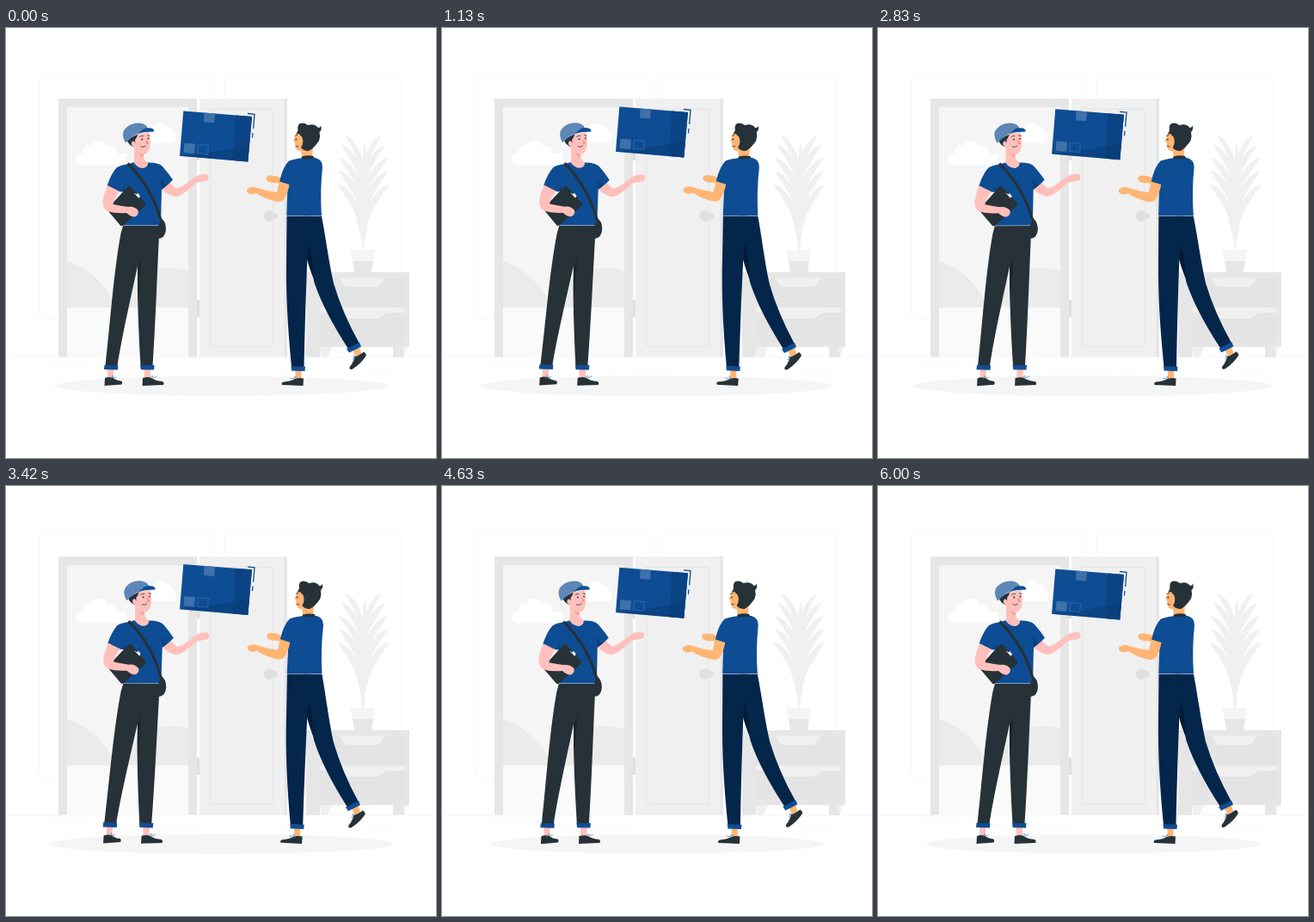
Recreate the animation shown at these times as an HTML page. Size 500 px wide and 500 px high, loop 6.04 s.

```html
<!DOCTYPE html>
<html lang="en">
<head>
<meta charset="utf-8">
<title>Parcel delivery</title>
<style>
  html, body { margin: 0; width: 100%; height: 100%; overflow: hidden; background: #fff; }
  svg { display: block; width: 100%; height: 100%; }
  .blue { fill: #0e4d94; } .ink { fill: #263238; } .navy { fill: #05264b; }
  .pink { fill: #ffc0bc; } .tan { fill: #ffb573; } .line { fill: none; stroke-linecap: round; stroke-linejoin: round; }
</style>
</head>
<body>
<svg viewBox="0 0 500 500">
  <g id="room">
    <g fill="none" stroke="#ebebeb" stroke-width=".4">
      <rect x="38.3" y="55.1" width="204.4" height="282.6" rx="5.6"/>
      <rect x="254.5" y="55.1" width="204.4" height="282.6" rx="5.6"/>
      <path d="M0 382.5H500M52.5 391h43.2M104.6 391h6.3M131.5 395.2h93.7M396.6 389.3h19.2M416.8 398.6h33.1M322.5 401.3h8.7"/>
    </g>
    <path fill="#e6e6e6" d="M61 82H222V382.5H61Z"/>
    <path fill="#f5f5f5" d="M71 92H212V382.5H71Z"/>
    <path fill="#fff" d="M87 159.500C79 159 79 146 89 145.500C88 138 95 135 98 136.500C103 128 116 130 118 138C124 135 129 140 129 146H140V159.500ZM166 134C160 131 164 123 170 122C168 110 182 107 187 115C191 114 194 118 193 121C200 121 199 134 193 134Z"/>
    <path fill="#ebebeb" d="M71 271C96 279 116 298 128 325H71ZM118 325C140 300 160 279 190 279Q203 279 212 283V325Z"/>
    <path fill="#fafafa" d="M71 325H212V382.5H71Z"/>
    <path fill="#e0e0e0" d="M222 316h3v20h-3ZM222 134h3v20h-3Z"/>
    <path fill="#f0f0f0" d="M225 82H327V382.5H225Z"/>
    <path fill="#e6e6e6" d="M323.500 82H327V382.5H323.500Z"/>
    <path fill="none" stroke="#e3e3e3" stroke-width=".9" d="M238 94.300H310V370H238Z"/>
    <path fill="#e0e0e0" d="M306 212a6.500 6.500 0 1 0 5 10.500h3q2-1 2-3.500t-2-4h-3a6.500 6.500 0 0 0-5-3Z"/>

    <path fill="#e6e6e6" d="M349 284H365V382.5H349Z"/>
    <path fill="#f0f0f0" d="M361 284H469V371H361Z"/>
    <path fill="#e6e6e6" d="M361 284H469V371H464V290.500H365V365H464V371H361Z"/>
    <path fill="#e4e4e4" d="M365 290.500H386Q389 291 391 296T398 301H430Q434 301 437 296T443 290.500H464V325H365ZM365 331H386Q389 331.500 391 335T398 338H430Q434 338 437 335T443 331H464V365H365Z"/>
    <path fill="#f0f0f0" d="M365 325H464V331H365ZM365 371H379L374 382.5H366ZM450 371H466L463 382.5H450Z"/>
    <path fill="#e6e6e6" d="M450 371H460L463 382.5H450Z"/>
    <g id="leaves" fill="#f0f0f0"></g>
    <path fill="#f5f5f5" d="M400.500 258H429L427 272H402.500Z"/>
    <path fill="#e6e6e6" d="M403 271H427L425 284H405Z"/>
  </g>

  <ellipse id="shadow" cx="250" cy="416.2" rx="193.9" ry="11.3" fill="#f5f5f5"/>

  <g id="parcel">
    <path class="blue" d="M206.300 96.500L286 102.900L281.300 155.500L202 148.700Z"/>
    <path fill="#0b4485" d="M267 101.400L286 102.900L281.300 155.500L264 154Z"/>
    <path fill="#083a75" opacity=".5" d="M202 148.700Q246 145 283 135.500L281.300 155.500Z"/>
    <path fill="#3f71aa" d="M230.500 98.500L243 99.500L242 110.500L230 109.500ZM207.500 133.800L220 134.800L219 146L206.500 145Z"/>
    <path fill="none" stroke="#3f71aa" stroke-width=".7" d="M223.500 135.400L235.500 136.400L234.500 146.600L222.500 145.600Z"/>
    <path fill="none" stroke="#0e4d94" stroke-width="1.300" d="M281 99.500L289 100.300L287.600 117M286.900 122L286.400 127.500"/>
  </g>

  <g id="courier">
    <path class="pink" d="M118 395h7.500l-.8 14h-6.500ZM160.500 395h8l-.7 14h-6.800Z"/>
    <path class="ink" d="M115 407Q119 405.500 124 406.500Q128 410 134 410.500Q136 412 134.500 414.500L114.500 416ZM159 407Q164 405.500 168.500 406.500Q174 410.500 182 411Q184.500 412.500 183 415L158.500 416Z"/>
    <path class="line" stroke="#6f9ac5" stroke-width=".9" d="M122 407l2-3 1 3 3-1M168 407l2-3 1 3 4-2"/>
    <path class="ink" d="M136 230H178.500C176 280 174 340 170.500 393H156.500C154 350 152.500 310 153 277C145 314 134.500 360 129.500 393H115.500C121 345 125 285 133.500 239Z"/>
    <path fill="#1c262b" d="M158 260Q157 272 153.300 277Q153 296 153.800 318Q156 285 158 260Z"/>
    <path class="blue" d="M114.500 391.700L130.500 392.200L130 397.500L114 397ZM156 392H172.500L172 397.500L156.800 397.300Z"/>

    <path class="pink" d="M176 180L188 177Q194 184 198 186.500C206 185 213 178 220 173Q225 169.500 233 170Q236 171 235.500 175Q235 178 229 178.500L221 180C213 187 204 196 197 196Q190 196 178 185Z"/>
    <path class="blue" d="M141 158.500Q152 154 166 156.500Q178 156.500 182 161Q189 169 194 176.500Q187 184 181 187.500L180 229.500H137L138 190L133 190.500Q124 188 117.500 183.500Q122 170 128.500 162.500Q134 159 141 158.500Z"/>
    <path fill="#083a75" opacity=".6" d="M180 174Q183 181 187 183L181 188ZM138 183L134 190.500L138 190Z"/>
    <path class="pink" d="M149 139V157Q153 163 160 163Q166 161 165 156Q160 154 159.500 147Z"/>
    <path fill="#f49b98" d="M154 145Q157 147.500 160 147L160 150Q155 149 154 145Z"/>
    <path class="pink" d="M147 125L166 121Q168 127 167.800 134Q167.500 146 160 147Q153 147 150 139Q145 139 144.500 134Q145 130 149 131Z"/>
    <path class="ink" d="M140.500 130L153 123.500Q152.500 128 150 130Q151 134 149 138Q143 137 140.500 130Z"/>
    <path class="pink" d="M147 131.500Q151 131.500 151 137L148 138Q144 135 147 131.500Z"/>
    <path fill="#5d87b6" d="M139 133.500Q133 123 138.500 117Q145 110 155 110.500Q163 111 165 117L164 120Q151 121 143 130Z"/>
    <path class="blue" d="M157 120Q160 115 169 116.500Q173 118 172 120.500L162 121Q151 122 141 132.500Z"/>
    <circle class="ink" cx="158.300" cy="129.500" r="1"/><circle class="ink" cx="165.500" cy="128.500" r=".9"/>
    <path class="line" stroke="#263238" stroke-width=".8" d="M155.500 126.500Q157 124.800 159.500 125.500M164.500 124.800L167 125.500M157 138Q160 139.500 162.500 137"/>
    <path fill="#f28f8f" d="M163 129L166.300 134.500L163 135Z"/>

    <path class="ink" d="M142 184Q144 183 146 185.500L162 203.500Q163 205 161 207.500L137 229Q134.500 231.500 132.500 229L119 213Q118 211 120 208Z"/>
    <path fill="#fff" d="M148.500 191.500L152 193.500L153.500 191.800L154.500 194L156 195L154.500 198Z"/>
    <path class="pink" d="M118 183L132 190Q126.500 197 124.500 205Q134 207 142 208Q149 207 153.500 212Q155 216 151 219Q147 221 140 215Q127 216 118 213Q111 209 113 199Q115 190 118 183Z"/>
    <path class="line" stroke="#263238" stroke-width="3.200" style="stroke-linecap:butt" d="M141.500 157.500C157 173 172 195 179.500 222"/>
    <path class="ink" d="M179 220Q186 224 186 234Q185.500 244 177.500 245L176 231Q179 229 179 220Z"/>
  </g>

  <g id="client">
    <path class="tan" d="M336.500 396h7v12h-7ZM402 373l8-4 4 12-6 3Z"/>
    <path class="ink" d="M346 407.500Q341 406.500 337 407.500Q331 411 323 411.500Q319.500 412.500 321 415L345.500 416ZM416 376.500Q418.500 378 419 380.500Q414 389 404 396Q401 398 399.500 396Q399 394 402 391Q405 386 405.500 382Q409 382 416 376.500Z"/>
    <path class="line" stroke="#6f9ac5" stroke-width=".9" d="M338 408l-2-3-1 3-4-1M407 382l-3-1 1 4-2 0"/>
    <path class="navy" d="M345 218.800H367C372 245 375 270 381 297Q391 331 411 367L398 373Q370 330 358.500 296L350 258Z"/>
    <path fill="#021a36" d="M351 249Q356 258 357.500 291Q351 275 349 264Z"/>
    <path class="navy" d="M326.500 218.800H354Q353 243 350.500 264Q348 325 346.500 394H332Q325 325 326 270Z"/>
    <path class="blue" d="M331.500 393.300L348 393.700L347.500 399L332 398.500ZM396 373L411 365.500L413 370.500L399 377.500Z"/>

    <path class="tan" d="M321 182Q317 180 313 180Q306 180.500 303 177Q301 172 307 171.500Q314 171 319 174L325 175Z"/>
    <path class="tan" d="M343 134L357 138L356 151Q349 153 343.500 150Q344.500 145 342 142Z"/>
    <path class="tan" d="M339 119L349 122L351 139Q344 144 339.500 142.500Q336 141 336 133L334 131L336.500 126Z"/>
    <path class="ink" d="M337 123.500Q339.500 121 339.500 119Q338.500 112.500 342 111Q346 109.500 351 113Q359 110.500 363 116Q366 116 366 113Q368 118 364.500 121Q366 126 364 131Q358 140 352 143Q346 143 343 139Q346 135 345 129Q342 127 341.500 123.500Q339 122.500 337 123.500Z"/>
    <path class="tan" d="M341 125Q345 125 344.500 130Q344 134 341 134Z"/>
    <circle class="ink" cx="337.300" cy="129.500" r=".9"/>
    <path class="line" stroke="#263238" stroke-width=".9" d="M336 125.500l2.500-1.200M337 137.500q1 .8 2.500.2"/>
    <path class="blue" d="M329 154.500Q342 149.500 360 151Q368 153 368 162Q365 190 367 218.300H326.300L327.500 182Q322 181 318 178.500Q322 161 329 154.500Z"/>
    <path class="ink" d="M344 149.500Q351 147.500 357.500 149L358.500 151.500Q351 152.500 343.500 152Z"/>
    <path class="tan" d="M318 178.500L329.500 182Q328 192 322.500 200Q319 204 308 200Q298 197 291 192Q285 194.500 281.500 192Q278 188 282 186Q288 183.500 294 186.500Q305 190 315 191Z"/>
  </g>
</svg>
<script>
  const $ = id => document.getElementById(id);

  // Plant: curved leaf pairs [base y, tip y, reach] around a stem.
  const leaf = (base, tip, reach) =>
    `<path d="M415.500 ${base + 12}Q${415.5 + reach * .25} ${base - 10} ${415.5 + reach} ${tip}` +
    `Q${415.5 + reach * .55} ${tip + 1} 415.500 ${base - 9}Z"/>`;
  $('leaves').innerHTML =
    [[162, 125, 21], [174, 136, 26], [190, 151, 29], [207, 166, 29], [224, 182, 30]]
      .map(([b, t, r]) => leaf(b, t, -r) + leaf(b, t, r)).join('') +
    '<path d="M417 132Q421 150 418 175L416 258H414.500L412 220L415 160Q414 145 417 132Z"/>' +
    '<path d="M402 206Q412 232 414.500 258H416Q418 230 428 206L415.500 190Z"/>';

  // Linear interpolation through [position, value] keys.
  function track(keys, p) {
    const i = Math.max(1, keys.findIndex(k => k[0] >= p));
    const [a, u] = keys[i - 1], [b, v] = keys[i];
    return u + (v - u) * (p - a) / (b - a);
  }
  const sway = [[0, 0], [.25, 1], [.75, -1], [1, 0]];
  const lift = [[0, 0], [.5, -10], [1, 0]];
  const beat = [[0, 1], [.1, 1.1], [.3, 1], [.4, 1], [.5, 1.1], [.6, 1], [1, 1]];

  const LOOP = 6040, FPS = 24;
  const move = (id, value) => $(id).setAttribute('transform', value);

  function draw(now) {
    const step = Math.floor(now % LOOP * FPS / 1000 + .15);
    const t = Math.min(step, 144) / FPS;
    const angle = track(sway, t / 3 % 1);
    move('courier', `rotate(${angle} 175 264)`);
    move('client', `rotate(${angle} 349.5 263.5)`);
    move('parcel', `translate(0 ${track(lift, t / 1.5 % 1)})`);
    move('shadow', `translate(250 416.2) scale(${track(beat, t / 6 % 1)}) translate(-250 -416.2)`);
  }

  const start = performance.now();
  (function loop() {
    draw(performance.now() - start);
    requestAnimationFrame(loop);
  })();
</script>
</body>
</html>
```
